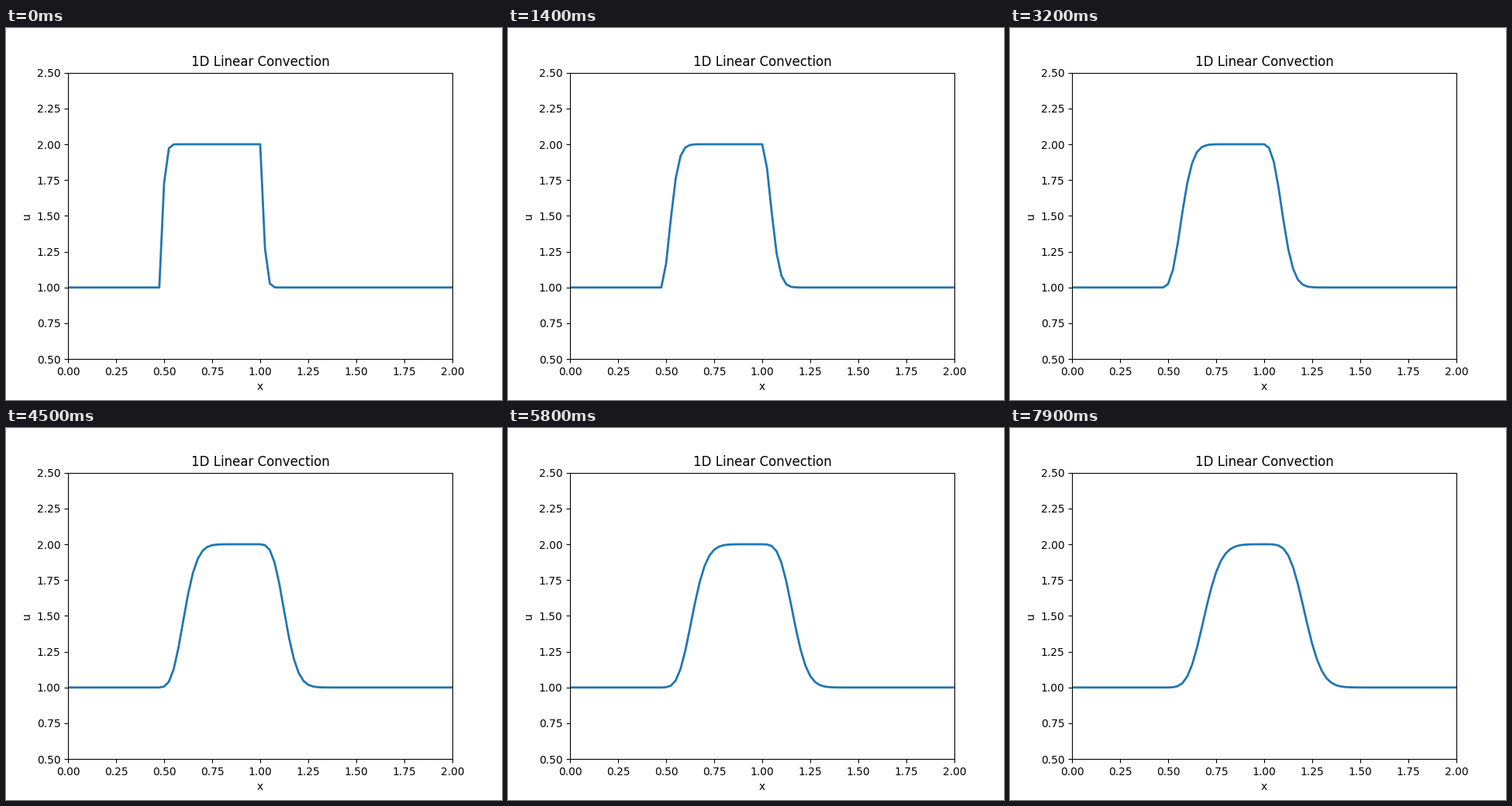
Recreate the animation shown at these times as a matplotlib script. Size 640 px wide and 480 px high, loop 8 s.

```python
import numpy as np
import matplotlib.pyplot as plt
from matplotlib.animation import FuncAnimation

FRAMES = 80
INTERVAL = 100   # ms
WARMUP = 3       # steps already taken when the loop starts

nx = 81
dx = 2 / (nx - 1)
c = 1.0
dt = 0.1 * dx
x = np.linspace(0, 2, nx)


def step(u):
    """Advance the wave by one upwind step."""
    new = u.copy()
    new[1:] = u[1:] - c * dt / dx * (u[1:] - u[:-1])
    return new


def solve():
    u = np.ones(nx)
    u[int(0.5 / dx):int(1 / dx + 1)] = 2
    states = [u]
    for _ in range(WARMUP + FRAMES - 1):
        states.append(step(states[-1]))
    return states[WARMUP:]


waves = solve()

fig, ax = plt.subplots(figsize=(6.4, 4.8), dpi=100)
line, = ax.plot(x, waves[0], lw=2)
ax.set_xlim(0, 2)
ax.set_ylim(0.5, 2.5)
ax.set_xlabel("x")
ax.set_ylabel("u")
ax.set_title("1D Linear Convection")


def update(i):
    line.set_data(x, waves[i])
    return line,


anim = FuncAnimation(fig, update, frames=FRAMES, interval=INTERVAL,
                     repeat=True, repeat_delay=0, blit=False)
plt.show()
```
